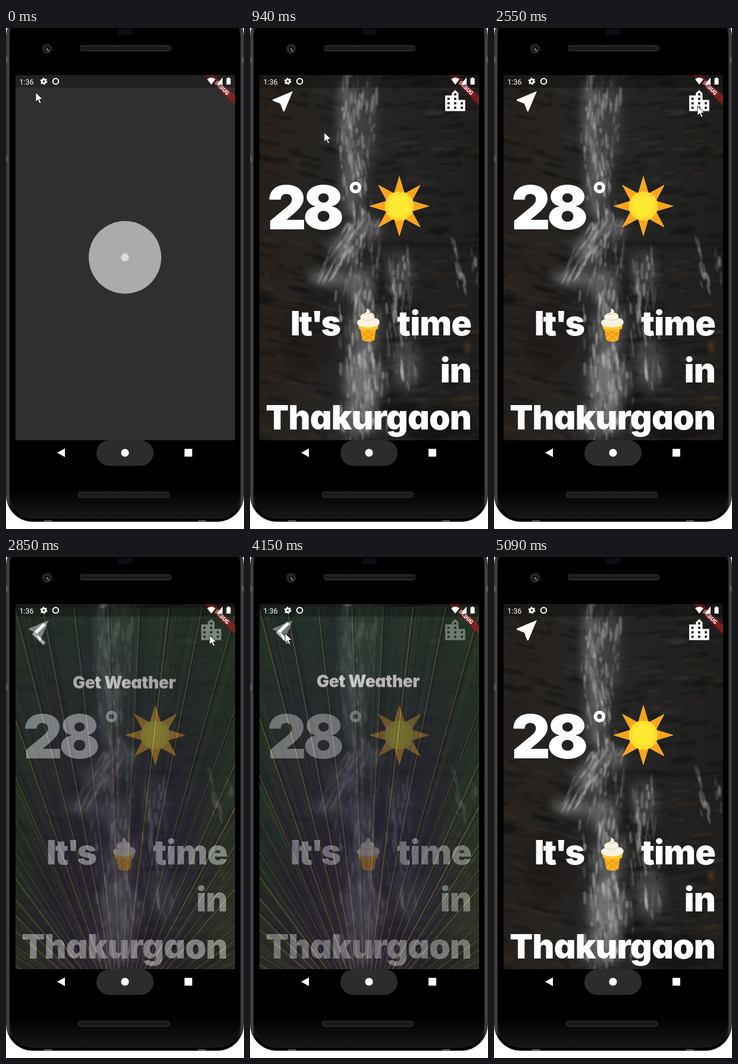
An HTML page with a canvas for the animation above (5900 ms loop, 400 by 841 pixels).

```html
<!DOCTYPE html>
<html lang="en">
<head>
<meta charset="utf-8">
<title>Weather app</title>
<style>
html, body { margin: 0; width: 100%; height: 100%; overflow: hidden; background: #fff; }
.stage { position: relative; width: 400px; height: 841px; overflow: hidden; }
.stage > svg, .page > * { position: absolute; left: 0; top: 0; display: block; }
.screen { position: absolute; left: 16px; top: 79px; width: 369px; height: 613px; overflow: hidden; background: #2f2f2f; }
.page { position: absolute; inset: 0; }
.big { font: 900 57px Inter, Lato, sans-serif; font-feature-settings: "cv11"; letter-spacing: -.8px; fill: #fff; }
.clock { font: 400 12.5px Roboto, sans-serif; fill: #fff; }
.debug { font: 900 9.2px Roboto, sans-serif; fill: #fff; }

.ball { transform-origin: 200px 385px; fill: #fff; fill-opacity: .6; }
.outer { animation: shrink 5.9s linear infinite; }
.inner { animation: grow 5.9s linear infinite; }
@keyframes shrink { 0%, .85% { transform: scale(1); } 8.5%, 100% { transform: scale(.66); } }
@keyframes grow { 0%, .85% { transform: scale(.107); } 8.5%, 100% { transform: scale(.3); } }

.weather { animation: fadeIn 5.9s infinite, riseIn 5.9s infinite; }
@keyframes fadeIn {
  0%, 2.7% { opacity: 0; animation-timing-function: cubic-bezier(.42,0,1,1); }
  8.29%, 100% { opacity: 1; }
}
@keyframes riseIn {
  0%, 2.7% { transform: translateY(153px); animation-timing-function: cubic-bezier(.4,0,.2,1); }
  8.29%, 100% { transform: none; }
}
.search { animation: fadeInOut 5.9s infinite, riseInOut 5.9s infinite; }
@keyframes fadeInOut {
  0%, 44.17% { opacity: 0; animation-timing-function: cubic-bezier(.42,0,1,1); }
  49.76% { opacity: 1; }
  69.15% { opacity: 1; animation-timing-function: cubic-bezier(0,0,.58,1); }
  74.74%, 100% { opacity: 0; }
}
@keyframes riseInOut {
  0%, 44.17% { transform: translateY(153px); animation-timing-function: cubic-bezier(.4,0,.2,1); }
  49.76% { transform: translateY(0); }
  69.15% { transform: translateY(0); animation-timing-function: cubic-bezier(.8,0,.6,1); }
  74.74%, 100% { transform: translateY(153px); }
}
</style>
</head>
<body>
<div class="stage">
  <svg width="400" height="841">
    <defs>
      <linearGradient id="side">
        <stop offset="0" stop-color="#2a2a2a"/><stop offset=".008" stop-color="#4a4a4a"/>
        <stop offset=".016" stop-color="#191919"/><stop offset=".03" stop-color="#000"/>
        <stop offset=".97" stop-color="#000"/><stop offset=".984" stop-color="#191919"/>
        <stop offset=".992" stop-color="#4a4a4a"/><stop offset="1" stop-color="#2a2a2a"/>
      </linearGradient>
      <linearGradient id="chin" x2="0" y2="1">
        <stop offset="0" stop-color="#000"/><stop offset=".94" stop-color="#000"/><stop offset="1" stop-color="#171717"/>
      </linearGradient>
      <pattern id="mesh" width="3" height="3" patternUnits="userSpaceOnUse">
        <rect width="3" height="3" fill="#151515"/><circle cx="1.5" cy="1.5" r=".8" fill="#303030"/>
      </pattern>
    </defs>
    <rect x=".5" y="-30" width="399" height="858.5" rx="44" fill="url(#side)" stroke="#3c3c3c"/>
    <rect x="6" y="-24" width="388" height="847" rx="38" fill="url(#chin)" stroke="#222"/>
    <path d="M0 48h4v10H0zM0 214h4v10H0zM396 48h4v10h-4z" fill="#555"/>
    <path d="M64 826h13v3H64zM323 826h13v3h-13z" fill="#555"/>
    <rect x="187" y="1" width="27" height="11" rx="5" fill="#0d0c14"/>
    <circle cx="69" cy="35" r="8.5" fill="#222"/>
    <circle cx="69" cy="35" r="5" fill="#111" stroke="#3a3a3a"/>
    <path d="M68 34l4 5" stroke="#999" stroke-width="1.6"/>
    <g fill="url(#mesh)" stroke="#3b3b3b">
      <rect x="124.5" y="29.5" width="153" height="9" rx="4"/>
      <rect x="121.5" y="779" width="153" height="9" rx="4"/>
    </g>
    <rect x="152" y="692" width="96" height="43" rx="21.5" fill="#2c2c2c"/>
    <g fill="#fff"><path d="M86 713l13-7.3v14.6zM300 706.5h13v13h-13z"/><circle cx="200" cy="713" r="6.6"/></g>
  </svg>

  <div class="screen">
    <div class="page">
      <svg width="369" height="613" viewBox="16 79 369 613">
        <circle class="ball outer" cx="200" cy="385" r="61"/>
        <circle class="ball inner" cx="200" cy="385" r="61"/>
      </svg>
    </div>

    <div class="page weather">
      <canvas id="falls" width="369" height="613"></canvas>
      <svg width="369" height="613" viewBox="16 79 369 613">
        <g fill="#fff">
          <path transform="translate(32.3 100.3) scale(1.89)" d="M21 3L3 10.53v.98l6.84 2.65L12.48 21h.98z"/>
          <path transform="translate(322.4 100.2) scale(1.87)" d="M15 11V5l-3-3-3 3v2H3v14h18V11h-6zm-8 8H5v-2h2v2zm0-4H5v-2h2v2zm0-4H5V9h2v2zm6 8h-2v-2h2v2zm0-4h-2v-2h2v2zm0-4h-2V9h2v2zm0-4h-2V5h2v2zm6 12h-2v-2h2v2zm0-4h-2v-2h2v2z"/>
        </g>
        <text class="big" x="29" y="338" style="font-size:102px;letter-spacing:-6px">28</text>
        <text class="big" x="177" y="299" text-anchor="middle" style="font-size:56px;font-weight:700">°</text>
        <polygon id="rays" fill="#fca41c" stroke="#fdb52a"/>
        <radialGradient id="core"><stop offset=".6" stop-color="#ffea32"/><stop offset="1" stop-color="#fdd52c"/></radialGradient>
        <circle cx="251" cy="299" r="24.5" fill="url(#core)"/>
        <text class="big" x="68" y="516" style="letter-spacing:-3px">It's</text>
        <g>
          <path d="M185 504l4 20q9.5 5 20 0l3-20z" fill="#fbb41f"/>
          <path d="M187 510l20 15M194 506l16 12M211 510l-20 15M204 506l-16 12" stroke="#e78f13" stroke-width="1.2"/>
          <path d="M182 497h34l-1 8q-16 5-32 0z" fill="#fdc52c"/>
          <path d="M196 471c4 1 7 3 6 7 6 0 8 5 7 9 8 0 11 7 7 11-7 6-26 6-34 1-4-4-2-9 4-10-2-6 1-9 6-10 4-1 5-4 4-8z" fill="#fbf3e0"/>
          <path d="M187 489q12 4 22-2M191 480q7 2 11-2" fill="none" stroke="#e2d5b8" stroke-width="1.3"/>
        </g>
        <g class="big" text-anchor="end">
          <text x="372" y="516">time</text>
          <text x="372" y="595">in</text>
          <text x="372" y="674">Thakurgaon</text>
        </g>
      </svg>
    </div>

    <div class="page search">
      <canvas id="leaf" width="369" height="613"></canvas>
      <svg width="369" height="613" viewBox="16 79 369 613">
        <path d="M64.5 106L47.5 122.5l17 16.5" fill="none" stroke="#fff" stroke-width="5.5"/>
        <text class="big" x="198.5" y="214" text-anchor="middle" style="font-size:28px;letter-spacing:-.4px">Get Weather</text>
      </svg>
    </div>

    <div class="page">
      <svg width="369" height="613" viewBox="16 79 369 613">
        <g transform="translate(385 79) rotate(45)">
          <rect x="-36" y="25.1" width="72" height="10.8" fill="#b71c1c" fill-opacity=".63"/>
          <text class="debug" y="33.8" text-anchor="middle">DEBUG</text>
        </g>
        <rect x="16" y="79" width="369" height="21" opacity=".27"/>
        <text class="clock" x="22.5" y="94.5">1:36</text>
        <g fill="none" stroke="#fff">
          <circle cx="63.5" cy="89.5" r="3.2" stroke-width="2.8"/>
          <circle cx="63.5" cy="89.5" r="5" stroke-width="2" stroke-dasharray="2.618"/>
          <circle cx="83.5" cy="89.5" r="4.8" stroke-width="2"/>
        </g>
        <path d="M338 86q7-5.5 14 0l-7 9zM364 83v12h-10zM370.5 84.5h2v-1.5h3v1.5h2V95h-7z" fill="#fff"/>
      </svg>
    </div>
  </div>

  <svg width="400" height="841">
    <path id="cursor" d="M0 0V16L3.8 12.6L6.4 18.7L9 17.6L6.4 11.6H11.5Z" fill="#fff" stroke="#111" stroke-width=".9"/>
  </svg>
</div>

<script>
const LOOP = 5900;
let seed = 7;
const rnd = () => (seed = seed * 16807 % 2147483647) / 2147483647;
const spread = w => (rnd() - .5) * w;

function open(id) {
  const c = document.getElementById(id).getContext('2d');
  c.translate(-16, -79);
  return c;
}

function blob(c, x, y, rx, ry, tilt, color) {
  c.fillStyle = color;
  c.beginPath();
  c.ellipse(x, y, rx, ry, tilt, 0, 7);
  c.fill();
}

function paintFalls() {
  const c = open('falls');
  const base = c.createLinearGradient(16, 0, 385, 0);
  base.addColorStop(0, '#26211d');
  base.addColorStop(.5, '#262625');
  base.addColorStop(1, '#1f1e1d');
  c.fillStyle = base;
  c.fillRect(16, 79, 369, 613);

  // layered rock
  c.filter = 'blur(1.3px)';
  for (let i = 0; i < 480; i++) {
    const x = 16 + rnd() * 369, y = 79 + rnd() * 613;
    const tone = rnd() < .65 ? '13,13,13' : x < 120 || x > 320 ? '66,50,36' : '62,61,60';
    blob(c, x, y, 5 + rnd() * 20, 1 + rnd() * 4, x < 200 ? .25 : -.1, `rgba(${tone},.3)`);
  }

  // soft spray: centre, radii, alpha
  const spray = [
    [163, 150, 13, 75, .38], [196, 150, 16, 75, .16], [172, 260, 18, 60, .32],
    [190, 338, 30, 16, .4], [158, 372, 20, 26, .42], [130, 420, 32, 12, .4],
    [182, 430, 26, 30, .35], [192, 505, 26, 45, .3], [190, 590, 32, 50, .45],
    [262, 565, 22, 38, .25], [250, 410, 24, 34, .18], [180, 655, 36, 30, .32]
  ];
  c.filter = 'blur(9px)';
  for (const [x, y, rx, ry, alpha] of spray) blob(c, x, y, rx, ry, 0, `rgba(205,205,207,${alpha})`);

  // streams: start, end, widths, strands
  const streams = [
    [180, 75, 174, 220, 72, 60, 95], [172, 190, 184, 335, 56, 50, 75],
    [185, 325, 125, 428, 55, 55, 75], [195, 325, 180, 460, 75, 75, 80],
    [185, 450, 190, 565, 80, 80, 65], [252, 372, 250, 475, 60, 55, 55],
    [250, 470, 264, 605, 60, 60, 60], [190, 550, 195, 695, 80, 110, 100],
    [343, 358, 358, 440, 10, 16, 18], [374, 365, 380, 440, 8, 10, 10]
  ];
  c.filter = 'blur(1px)';
  for (const [xa, ya, xb, yb, wa, wb, n] of streams) {
    const tilt = Math.atan2(xa - xb, yb - ya);
    for (let i = 0; i < n; i++) {
      const k = rnd(), u = (rnd() + rnd() - 1) * .55;
      const x = xa + (xb - xa) * k + u * (wa + (wb - wa) * k), y = ya + (yb - ya) * k;
      const tone = rnd() < .3 ? '30,30,30' : '220,220,222';
      blob(c, x, y, .6 + rnd() * 2.2, 4 + rnd() * 13, tilt + spread(.2), `rgba(${tone},${.1 + rnd() * .3})`);
    }
  }

  c.filter = 'blur(3px)';
  blob(c, 290, 364, 75, 4, .03, 'rgba(22,21,20,.8)');
  blob(c, 222, 425, 7, 36, 0, 'rgba(24,24,24,.55)');
  blob(c, 255, 640, 38, 11, .1, 'rgba(20,20,20,.9)');
  blob(c, 315, 665, 60, 28, -.1, 'rgba(20,19,18,.8)');
  blob(c, 95, 520, 45, 60, .1, 'rgba(25,22,20,.4)');
  blob(c, 365, 536, 5, 9, 0, 'rgba(110,72,35,.6)');
}

function paintLeaf() {
  const c = open('leaf'), vx = 193, vy = 775, rad = Math.PI / 180;
  c.fillStyle = '#2a2538';
  c.fillRect(16, 79, 369, 613);
  const ray = (deg, r) => [vx + Math.sin(deg * rad) * r, vy - Math.cos(deg * rad) * r];
  const reach = deg => Math.min(192 / Math.abs(Math.sin(deg * rad) || .001), 700 / Math.cos(deg * rad));
  const line = (deg, from, to, color, width) => {
    c.strokeStyle = color;
    c.lineWidth = width;
    c.beginPath();
    c.moveTo(...ray(deg, from));
    c.lineTo(...ray(deg, to));
    c.stroke();
  };

  const ribs = [];
  for (let d = -75; d <= 75; d += 4.3) ribs.push(d + spread(1));
  ribs.forEach((deg, i) => {
    const next = ribs[i + 1] ?? deg + 4, mid = (deg + next) / 2, far = reach(mid);
    const hue = mid < 0 ? 160 + mid : 140 - mid * 1.2;
    const glow = c.createRadialGradient(vx, vy, 0, vx, vy, far);
    glow.addColorStop(.5, '#2a2538');
    glow.addColorStop(1, `hsl(${hue},25%,${mid > 0 ? 20 : 18}%)`);
    c.fillStyle = glow;
    c.beginPath();
    c.moveTo(vx, vy);
    c.lineTo(...ray(deg, 900));
    c.lineTo(...ray(next, 900));
    c.fill();
    for (let k = 0; k < 12; k++) {
      const tone = rnd() < .6 ? '30,28,48' : '80,92,62';
      line(deg + (next - deg) * rnd(), far * (.2 + rnd() * .4), far * 1.2, `rgba(${tone},.24)`, .7 + rnd() * 2);
    }
  });
  ribs.forEach(deg => {
    line(deg + .25, 60, 900, 'rgba(25,22,38,.6)', 2.5);
    line(deg, 60, 900, `rgba(${deg > 25 ? '150,132,55' : '142,116,58'},${.6 + rnd() * .3})`, 1 + rnd() * .9);
  });
}

paintFalls();
paintLeaf();

document.getElementById('rays').setAttribute('points', Array.from({ length: 16 }, (_, i) => {
  const r = i % 2 ? 22.5 : 49.5, a = i * Math.PI / 8;
  return `${251 + r * Math.sin(a)},${299 - r * Math.cos(a)}`;
}).join(' '));

// pointer stops: time, x, y
const stops = [
  [0, 50, 108], [820, 50, 108], [950, 130, 180], [1080, 300, 330], [1200, 322, 480],
  [1300, 260, 556], [1390, 215, 540], [1520, 215, 540], [1640, 234, 653], [1710, 234, 653],
  [1800, 190, 600], [1930, 200, 420], [2110, 314, 158], [2160, 314, 158], [2330, 342, 131],
  [3240, 342, 131], [3330, 260, 185], [3430, 130, 219], [3500, 89, 178], [3570, 89, 178],
  [3700, 59, 128], [4400, 59, 128], [4480, 200, 300], [4590, 370, 600], [4590, -40, -40],
  [4970, -40, -40], [4970, 394, 818], [5090, 394, 818], [5090, -40, -40], [LOOP, -40, -40]
];
document.getElementById('cursor').animate(
  stops.map(([t, x, y]) => ({ offset: t / LOOP, transform: `translate(${x}px, ${y}px)` })),
  { duration: LOOP, iterations: Infinity }
);
</script>
</body>
</html>
```
